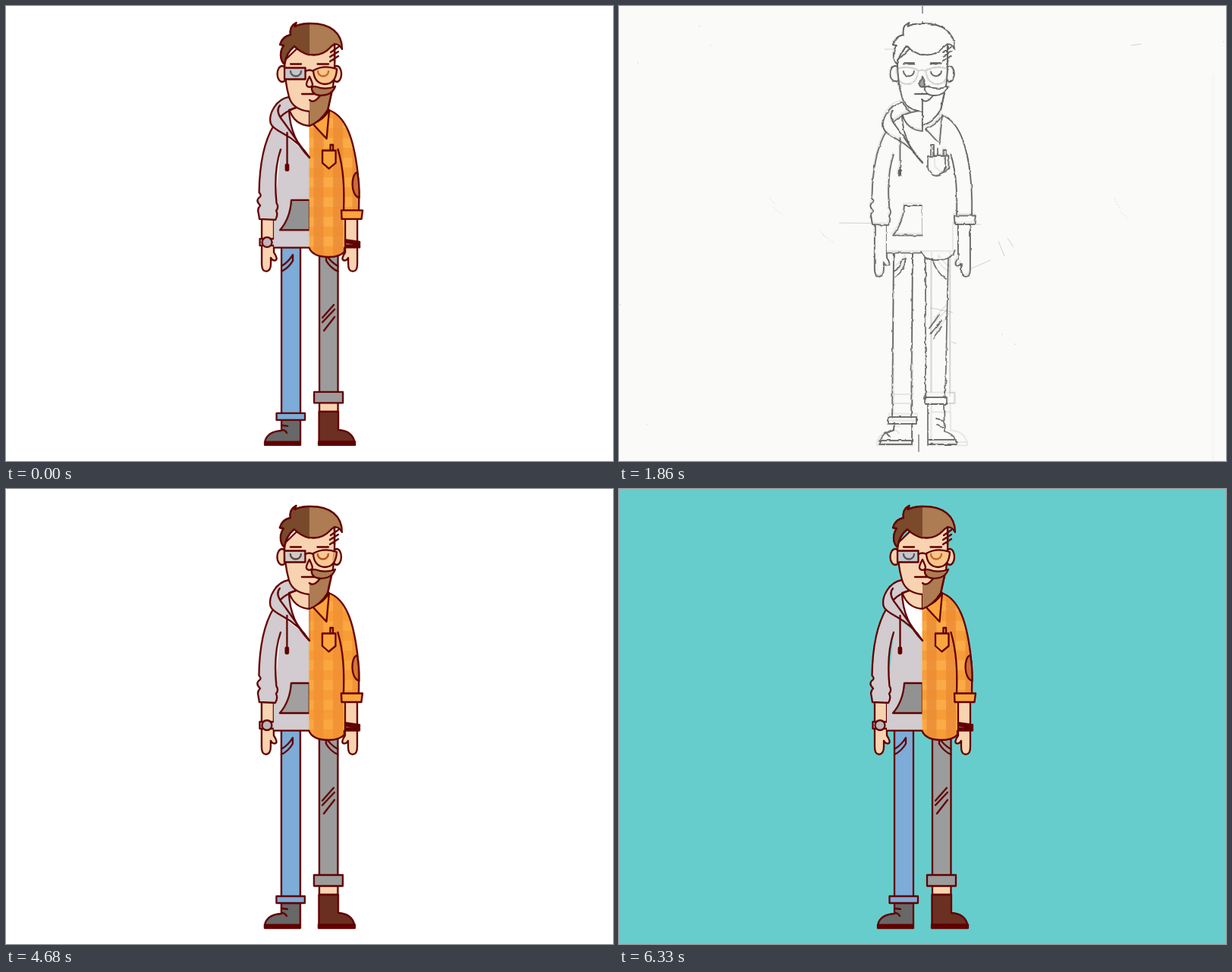
Write an HTML page that moves like this. It is 800 px wide and 600 px high and loops after 7200 ms.

```html
<!DOCTYPE html>
<html lang="en">
<head>
<meta charset="utf-8">
<title>Half and half</title>
<style>
html, body { margin: 0; width: 100%; height: 100%; overflow: hidden; background: #fff; }
svg { display: block; width: 100%; height: 100%; }

/* Each look is a palette inherited by the shared body parts. */
.look {
  --line: #610000; --w: 2.3px; --skin: #f8d3b1; --dark: #7a4a2b; --light: #ad7c52;
  --hoodie: #d2cbcf; --tee: #fff; --shirt: #ff9c2f; --cuff: #ffa63e; --jeans: #7cacd7;
  --grey: #9c9c9c; --shoe: #686868; --boot: #6b3022; --sole: #610000; --pouch: #d2cbcf;
  --watch: #beb5ba; --patch: none; --nose: #d6bdb8; --eyeL: #610000; --eyeR: #610000;
  --lensL: none; --lensR: none; --plain: 0; --trim: 1; --seam: 1;
}
.full {
  --shirt: url(#plaid); --cuff: #fba53e; --pouch: #929292; --patch: #cb6c34; --nose: #f8d3b1;
  --eyeL: #5b5558; --eyeR: #bf6a2b; --lensL: #c2c7cb; --lensR: #fac58a; --seam: 0;
}
.outline, .sketch {
  --line: #2b2327; --w: 2.2px; --skin: #fff; --dark: #fff; --light: #fff; --hoodie: #fff;
  --shirt: #fff; --cuff: #fff; --jeans: #fff; --grey: #fff; --shoe: #fff; --boot: #fff;
  --sole: #fff; --pouch: #fff; --nose: #fff; --eyeL: #2b2327; --eyeR: #2b2327;
  --plain: 1; --trim: 0; --seam: 0;
}
.sketch {
  --line: #686868; --w: 1.8px; --skin: #fafaf8; --dark: #fafaf8; --light: #fafaf8; --tee: #fafaf8;
  --hoodie: #fafaf8; --shirt: #fafaf8; --cuff: #fafaf8; --jeans: #fafaf8; --grey: #fafaf8;
  --shoe: #fafaf8; --boot: #fafaf8; --pouch: #fafaf8; --nose: #999; --eyeL: #686868; --eyeR: #686868; --plain: 0;
}

.ink { stroke: var(--line); stroke-width: var(--w); stroke-linejoin: round; stroke-linecap: round; fill: none; }
.bare { stroke: none; }
.skin { fill: var(--skin); } .dark { fill: var(--dark); } .light { fill: var(--light); }
.hoodie { fill: var(--hoodie); } .shirt { fill: var(--shirt); } .cuff { fill: var(--cuff); }
.jeans { fill: var(--jeans); } .grey { fill: var(--grey); } .shoe { fill: var(--shoe); }
.boot { fill: var(--boot); } .sole { fill: var(--sole); } .solid { fill: var(--line); }
.plain { opacity: var(--plain); } .trim { opacity: var(--trim); } .seam { opacity: var(--seam); }

.outline, .flat, .final, .back, .flash, .disc, .figure { animation: 7.2s linear infinite both; }
.outline { animation-name: toOutline; }
.flat { animation-name: toFlat; }
.final { animation-name: toFinal; }
.back { animation-name: back; }
.flash { animation-name: flash; }
.disc { animation-name: disc; transform-origin: 400px 302px; }
.figure { animation-name: figure; transform-origin: 400px 300px; }
@keyframes toOutline { 0%, 25.4167% { opacity: 0 } 30.8333%, 100% { opacity: 1 } }
@keyframes toFlat { 0%, 42.9167% { opacity: 0 } 48.3333%, 100% { opacity: 1 } }
@keyframes toFinal { 0%, 6.66% { opacity: 1 } 6.6667%, 60.8333% { opacity: 0 } 66.25%, 100% { opacity: 1 } }
@keyframes back { 0%, 6.66% { opacity: 0 } 6.6667%, 100% { opacity: 1 } }
@keyframes flash { 0%, .416% { opacity: 1 } .4167%, 100% { opacity: 0 } }
@keyframes disc {
  0% { transform: scale(1); animation-timing-function: cubic-bezier(.455, .03, .515, .955) }
  6.6667% { transform: scale(0) }
  75.2083% { transform: scale(0); animation-timing-function: cubic-bezier(.455, .03, .515, .955) }
  86.4583%, 100% { transform: scale(1) }
}
@keyframes figure {
  0% { transform: scale(1); opacity: 1; animation-timing-function: cubic-bezier(.455, .03, .515, .955) }
  2.9167% { opacity: .47 }
  6.66% { transform: scale(0); opacity: 0 }
  6.6667%, 100% { transform: scale(1); opacity: 1 }
}
</style>
</head>
<body>
<svg viewBox="0 0 800 600" preserveAspectRatio="none">
<defs>
  <pattern id="plaid" x="405.5" y="161" width="25.5" height="26" patternUnits="userSpaceOnUse">
    <path fill="#faab45" d="M0 0H26V26H0Z"/>
    <path fill="#e07a30" opacity=".5" d="M0 0H13V26H0Z"/>
    <path fill="#f08a2c" opacity=".42" d="M0 0H26V13H0Z"/>
  </pattern>
  <clipPath id="leftHalf"><path d="M300 0H400V200H300Z"/></clipPath>
  <filter id="pencil" x="300" y="0" width="220" height="600" filterUnits="userSpaceOnUse">
    <feTurbulence type="fractalNoise" baseFrequency=".12" numOctaves="2" seed="4"/>
    <feDisplacementMap in="SourceGraphic" scale="3" xChannelSelector="R" yChannelSelector="G"/>
  </filter>

  <g id="legs" class="ink">
    <path class="jeans" d="M363 317H388V538H363Z"/>
    <path d="M363 343Q372 338 378 328V336Q372 346 363 350"/>
    <path class="shoe" d="M388 546V575H341Q344 561 363 560V546Z"/>
    <path d="M363 553L371 554M363 559Q368 559 370 563"/>
    <path class="sole" d="M341 575H388V579H341Z"/>
    <path class="jeans" d="M356.5 537H394V546H356.5Z"/>
    <path class="grey" d="M413 317H437.5V510H413Z"/>
    <path d="M437.5 343Q428 338 422 328V336Q428 346 437.5 350"/>
    <path d="M417 411L432 394M417 417L433 400M419 428L433 410"/>
    <path class="skin" d="M413 523H437.5V535H413Z"/>
    <path class="boot" d="M412.5 535H438V559Q456 560 459.5 575H412.5Z"/>
    <path class="sole" d="M412 574.5H460V579H412Z"/>
    <path class="grey" d="M406 509H444V523.5H406Z"/>
  </g>

  <g id="torso" class="ink">
    <path class="skin" d="M337 279V340Q337 350 343 350Q349 349 349 340V332Q351 336 355 335.5Q359 334 353 325V279Z"/>
    <path class="skin" d="M447 279V325Q441 334 445 335.5Q449 336 451 332V340Q451 350 457 350Q463 350 463 340V279Z"/>
    <g class="trim">
      <path class="hoodie" d="M334.5 307H355.5V316H334.5Z"/>
      <circle cx="344" cy="311.5" r="6.5" style="fill:var(--watch)"/>
      <path class="solid" d="M445 308L466 311V314L445 312ZM445 315.5H466V318.5H445Z"/>
    </g>
    <path class="hoodie bare" d="M352 159L400 196V319H353V282L357 240L362 189Z"/>
    <path d="M353 318.7H400"/>
    <path class="hoodie" d="M353 157C339 180 334 212 333.5 246Q338 250 333 253Q329 257 335 263Q331 267 332.5 272L334 281L355 282Q359 275 356 270Q360 265 356.500 260C354 235 355 210 362 189"/>
    <path d="M376 256H400V295.500H361C371 284 375 272 376 256Z" style="fill:var(--pouch)"/>
    <path class="bare" d="M373 137L400 156V200Q372 164 373 137Z" style="fill:var(--tee)"/>
    <path class="shirt bare" d="M399.500 156L425 137C449 145 458 177 463 215Q466 240 465 270H445.500L446 319H399.500Z"/>
    <path d="M425 137C449 145 458 177 463 215Q466 240 465 270M437.500 189C445 215 446 240 445 270"/>
    <path class="shirt trim" d="M399.500 319C403 328 413 331 425 331Q440 331 446 324V319" />
    <path class="plain" d="M400 318.700H441V281"/>
    <path class="seam" d="M400.500 157V200"/>
    <path class="trim" d="M463 219C454 222 454 250 465.500 253Q466 235 463 219Z" style="fill:var(--patch)"/>
    <path class="cuff" d="M442 269.500H470L468.500 281H442.500Z"/>
    <path class="cuff" d="M427.500 183H431V191H427.500Z"/>
    <path class="cuff" d="M417 190.500H434.500V207L425.500 214.500L417 207Z"/>
    <path class="skin" d="M373 136Q380 157 400 158V130Z"/>
    <path class="cuff" d="M404 155L422.500 175L426 137Q418 151 404 155Z"/>
    <path class="hoodie" d="M373 120C355 123 346 143 348.500 154Q350 160 365 168C384 178 393 189 400 200C385 185 374 165 373 137L384 133Z"/>
    <path d="M361 131Q355 138 363 149C374 163 386 183 400 200M362 146Q368 139 384 133.500M370.500 167V209"/>
    <rect class="solid" x="368.700" y="209" width="3.400" height="8" rx="1"/>
  </g>

  <g id="head" class="ink">
    <ellipse class="skin" cx="364" cy="89.500" rx="6.500" ry="10.500"/>
    <ellipse class="skin" cx="436" cy="89.500" rx="6" ry="10.500"/>
    <path class="skin" d="M367 72C367 98 371 113 373 120Q378 137 400 139L424 138L431 106Q434 85 433 50L400 40Z"/>
    <path class="light bare" d="M400 124Q406 128 414 118L429 112L424 137Q414 153 400 158Z"/>
    <path d="M429 114L424 137Q414 153 400 158"/>
    <path class="plain" d="M400 123V158"/>
    <path class="light" d="M367 77C360 70 361 59 366 52L361 51Q364 40 375 38Q373 27 382.500 22L380.500 27Q389 23 402 23C427 23 443 35 443 57C438 49 433 48 427 55C415 68 396 68 380 53Q369 62 367 77Z"/>
    <path class="dark" clip-path="url(#leftHalf)" d="M367 77C360 70 361 59 366 52L361 51Q364 40 375 38Q373 27 382.500 22L380.500 27Q389 23 402 23V65Q390 63 380 53Q369 62 367 77Z"/>
    <path d="M427 67L438 60M427 73L438 66M428 61L438 54M433 50V74M375 76.500H389M410.500 76.500H425"/>
    <path d="M400 93Q395.500 101 396 104A4.200 4.200 0 0 0 404 104Q404 101 400 93Z" style="fill:var(--nose)"/>
    <path d="M390 116H410M400 124Q406 129 414 118"/>
    <path class="light" d="M403 110Q402 105 409 106.500Q421 111 434 106Q430 118 414 118Q404 117 403 110Z"/>
  </g>
  <g id="eyes" class="ink">
    <path d="M375 86A7 6.500 0 0 0 389 86" style="stroke:var(--eyeL)"/>
    <path d="M411 86A7 6.500 0 0 0 425 86" style="stroke:var(--eyeR)"/>
  </g>
  <g id="oddGlasses" class="ink">
    <path d="M367 81.500H394.500V96.500H367Z" style="fill:var(--lensL)"/>
    <path d="M405 85Q419 77 436 83Q435 103 420 103Q406 102 405 85Z" style="fill:var(--lensR)"/>
    <path d="M394.500 86Q400 83 405 86"/>
  </g>
  <path id="roundGlasses" class="ink" d="M395 85Q381 78 366 83Q367 103 380 103Q394 102 395 85ZM405 85Q419 78 434 83Q433 103 420 103Q406 102 405 85ZM395 86Q400 83 405 86"/>
  <g id="dressed">
    <use href="#legs"/><use href="#torso"/><use href="#head"/><use href="#oddGlasses"/><use href="#eyes"/>
  </g>
</defs>

<g class="look sketch">
  <path fill="#fafaf8" d="M0 0H800V600H0Z"/>
  <g fill="none" stroke="#bbb">
    <path d="M290 286L477 288M398 130V322M411 330V510M436 320V515M360 512H388M360 524H388" stroke-width=".7"/>
    <path d="M400 0V10M400 20V40M395 565V588" stroke="#777" stroke-width="1.500"/>
    <path d="M458 349L490 335M500 310L508 330M512 306L520 318M350 57H362M435 510H442V524H432M410 398L440 404M675 52L688 50M438 443L445 445" stroke-width=".7"/>
    <path d="M198 252L206 262M203 265L216 276M264 294L272 305M268 301L284 313M653 254L660 267M660 271L672 281" stroke="#ddd" stroke-dasharray="2 2"/>
  </g>
  <g fill="#d0d0d0">
    <circle cx="106" cy="27" r=".8"/><circle cx="25" cy="75" r=".8"/><circle cx="121" cy="52" r=".7"/>
    <circle cx="2" cy="394" r=".8"/><circle cx="37" cy="552" r=".7"/><circle cx="505" cy="433" r=".8"/>
    <circle cx="522" cy="446" r=".8"/><circle cx="797" cy="47" r=".8"/>
  </g>
  <path d="M783 90V600" stroke="#f3f3f2" stroke-width="1.500"/>
  <g filter="url(#pencil)">
    <g class="ink">
      <path d="M362 324L360 543M387 324L385 543M404 330V517M434 330L430 517"/>
      <path d="M362 350Q371 346 374 334L378 333Q376 350 364 357M413 335Q419 352 431 360"/>
      <path d="M409 425L422 407M411 432L425 415M414 438L425 423"/>
      <path d="M355 542H392V551H355ZM403 516H432V525H403Z"/>
      <path d="M363 551L362 558Q343 565 343 578H386V551M343 573H386M407 525V578H445Q444 565 429 561L428 525M407 572H444M351 562L357 568M419 552L427 555M418 545L427 547"/>
    </g>
    <use href="#torso" y="7"/>
    <g class="ink">
      <path class="shirt" d="M398 324Q404 336 420 335Q438 335 443 322"/>
      <path class="shirt" d="M407 198H430V212Q428 224 418 224Q408 223 407 212ZM412 197V183H415V197M420 197V188"/>
    </g>
    <use href="#head"/><use href="#eyes"/>
    <path class="ink" d="M400 123V158M376 75H388M411 75H424" stroke-width="2.500"/>
    <use href="#roundGlasses" opacity=".18"/>
  </g>
</g>

<g class="look outline">
  <path fill="#fff" d="M0 0H800V600H0Z"/>
  <g transform="translate(-1)">
    <use href="#legs" y=".5"/><use href="#torso" y="4.500"/><use href="#head"/>
    <use href="#roundGlasses"/><use href="#eyes"/>
  </g>
</g>

<g class="look flat">
  <path fill="#fff" d="M0 0H800V600H0Z"/>
  <use href="#dressed" x="-.6"/>
</g>

<g class="final">
  <path class="back" fill="#fff" d="M0 0H800V600H0Z"/>
  <circle class="disc" cx="400" cy="302" r="510" fill="#67cdcc"/>
  <path class="flash" fill="#fff" d="M0 0H800V600H0Z"/>
  <g class="figure"><g class="look full"><use href="#dressed"/></g></g>
</g>
</svg>
</body>
</html>
```
